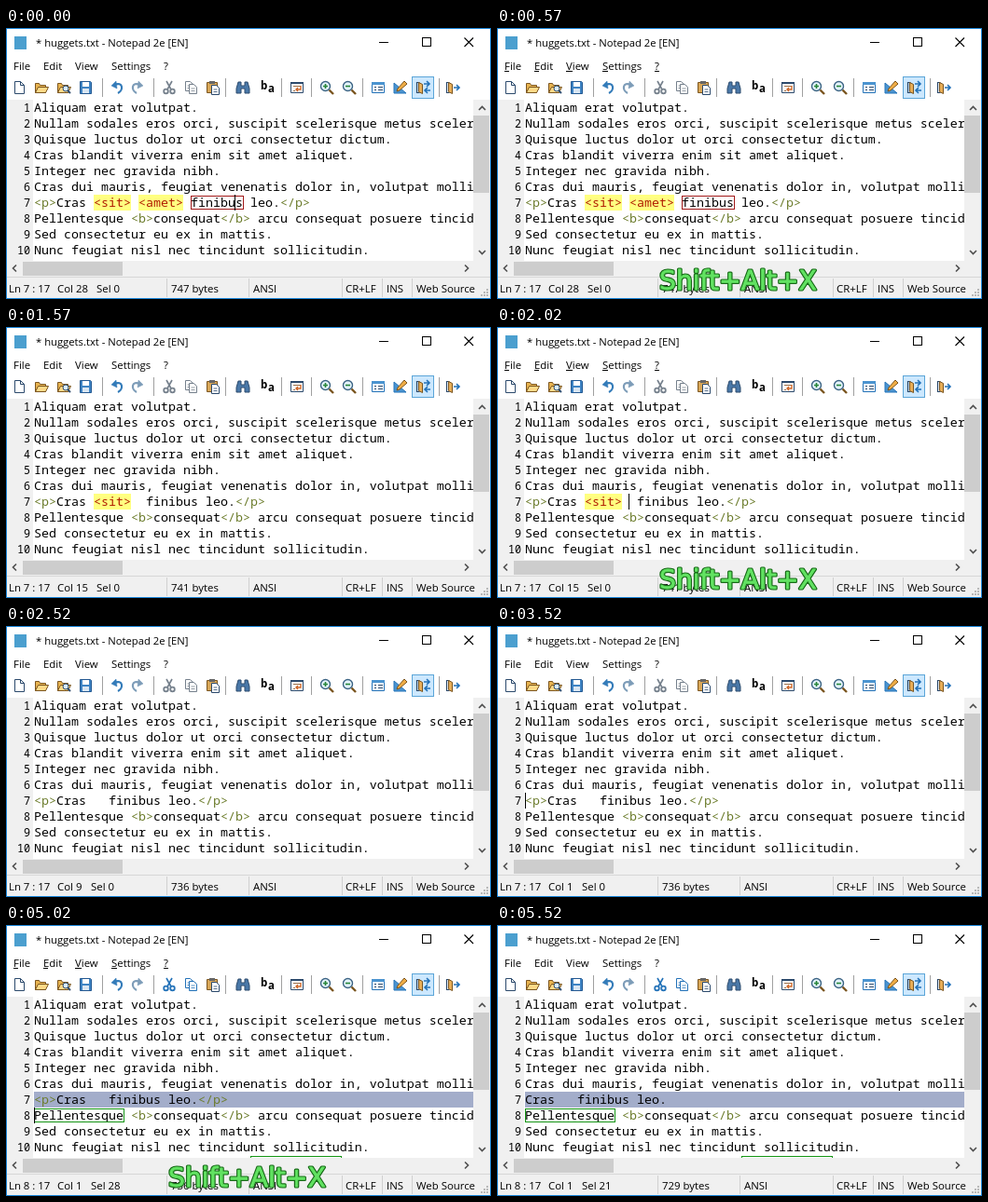
An HTML page that plays this animation: 520x291 px, repeating every 8 s.

```html
<!DOCTYPE html>
<html lang="en">
<head>
<meta charset="utf-8">
<title>Editor: strip tags</title>
<style>
html, body { margin: 0; width: 100%; height: 100%; overflow: hidden; background: #fff; }
svg { display: block; width: 100vw; height: 100vh; }
text { white-space: pre; }
.ui { font: 11.4px "Open Sans", "Noto Sans", sans-serif; }
.title { font: 11.25px "Open Sans", "Noto Sans", sans-serif; }
.glyph { font: 700 11.5px "Open Sans", "Noto Sans", sans-serif; }
.code { font: 13.333px "Noto Sans Mono", "DejaVu Sans Mono", monospace; }
.num { font: 11.7px "Noto Sans Mono", "DejaVu Sans Mono", monospace; text-anchor: end; }
.keys { font: 28.2px "DejaVu Sans", sans-serif; stroke-linejoin: round; }
.crisp { shape-rendering: crispEdges; }
</style>
</head>
<body>
<svg id="stage" viewBox="0 0 520 291"></svg>
<script>
const LOOP = 8000, LEFT = 30, RIGHT = 501, TOP = 77, CHAR = 8, ROW = 17;

const LINES = [
  'Aliquam erat volutpat.',
  'Nullam sodales eros orci, suscipit scelerisque metus sceler',
  'Quisque luctus dolor ut orci consectetur dictum.',
  'Cras blandit viverra enim sit amet aliquet.',
  'Integer nec gravida nibh.',
  'Cras dui mauris, feugiat venenatis dolor in, volutpat molli',
  '',
  'Pellentesque <b>consequat</b> arcu consequat posuere tincid',
  'Sed consectetur eu ex in mattis.',
  'Nunc feugiat nisl nec tincidunt sollicitudin.'
];

// Document states: text of line 7, caret position and status values.
const both = { text: '<p>Cras <sit> <amet> finibus leo.</p>', ln: 7, col: 28, sel: 0, bytes: 747, word: true };
const one = { text: '<p>Cras <sit>  finibus leo.</p>', ln: 7, col: 15, sel: 0, bytes: 741 };
const none = { text: '<p>Cras   finibus leo.</p>', ln: 7, col: 9, sel: 0, bytes: 736 };
const home = { ...none, col: 1 };
const selected = { ...home, ln: 8, sel: 28 };
const stripped = { ...selected, text: 'Cras   finibus leo.', sel: 21, bytes: 729 };

// [start ms, state, caret, menu underlines, key overlay]
const STEPS = [
  [0, both, 1, 0, 0],
  [570, both, 0, 1, 1],
  [1020, one, 1, 1, 0],
  [1570, one, 0, 0, 0],
  [2020, one, 1, 1, 1],
  [2520, none, 0, 0, 0],
  [3020, none, 1, 0, 0],
  [3520, home, 1, 0, 0],
  [4020, selected, 1, 0, 0],
  [4520, selected, 0, 0, 0],
  [5020, selected, 1, 1, 1],
  [5520, stripped, 0, 0, 0]
];

const rect = (x, y, w, h, fill, extra = '') =>
  `<rect class="crisp" x="${x}" y="${y}" width="${w}" height="${h}" fill="${fill}" ${extra}/>`;
const frame = (x, y, w, h, color, fill = 'none') =>
  rect(x + .5, y + .5, w - 1, h - 1, fill, `stroke="${color}"`);
const path = (d, stroke, width = 1, fill = 'none') =>
  `<path d="${d}" stroke="${stroke}" stroke-width="${width}" fill="${fill}"/>`;
const escape = s => s.replace(/&/g, '&amp;').replace(/</g, '&lt;');
const text = (x, y, s, cls = 'ui', extra = '') =>
  `<text class="${cls}" x="${x}" y="${y}" ${extra}>${s}</text>`;
const at = (x, content) => `<g transform="translate(${x} 56)">${content}</g>`;

function codeLine(source, row) {
  const y = TOP + row * ROW;
  let marks = '', spans = '';
  let col = 0;
  for (const part of source.split(/(<\/?\w+>)/)) {
    const unknown = /<(sit|amet)>/.test(part);
    if (unknown) marks += rect(LEFT + col * CHAR, y, part.length * CHAR, ROW, '#ffff80');
    const color = unknown ? '#b01c00' : part[0] === '<' ? '#6c7c2c' : '#000';
    spans += `<tspan fill="${color}">${escape(part)}</tspan>`;
    col += part.length;
  }
  return marks + text(LEFT, y + 13, spans, 'code');
}

function toolbar(canCut) {
  const navy = '#2c4a6c', blue = '#2372b8', brown = '#7a5520';
  const page = (x, y, color) => path(`M${x} ${y}h5l3 3v7h-8z`, color, 1, '#fff') +
    path(`M${x + 2} ${y + 4.5}h4m-4 2.5h4`, color, .8);
  const folder = path('M1.5 13.5v-10h4l1 2h6v8z', brown, 1, '#e8b450') +
    path('M1.5 13.5l3-6h11l-3 6z', brown, 1, '#ffd987');
  const cutColor = canCut ? blue : '#75808c';
  const lens = sign => '<circle cx="6.5" cy="6.5" r="5" fill="#e4f3fc" stroke="#3c6484" stroke-width="1.4"/>' +
    path('M10.5 10.5l4.5 4.5', brown, 2.4) + path(sign, '#268538', 1.6);
  const door = path('M4.5 2.5h-3v11h3', navy, 1.2) + path('M3.5 2.5l4 2v10l-4-2z', brown, 1, '#e8ae58');
  const arrow = (y, dir) => dir > 0
    ? path(`M9 ${y}h6m-3-3l3 3-3 3`, blue, 1.6)
    : path(`M16 ${y}h-6m3-3l-3 3 3 3`, blue, 1.6);
  const undo = color => path('M5 5c10-4 10 6 4 9', color, 2.2) + path('M7 1L2 6l6 3z', color, .5, color);

  return [103, 158, 235, 295, 327, 382, 464].map(x => rect(x, 54, 1, 20, '#a0a0a0')).join('') +
    at(7, path('M2.5 1.5h6l4 4v9h-10z', navy, 1, '#fff') + path('M8.5 1.5v4h4', navy)) +
    at(30, folder) +
    at(54, folder + '<circle cx="10" cy="9" r="3" fill="#d8effc" stroke="#2c4a6c"/>' + path('M12 11l3 3', navy, 1.8)) +
    at(78, path('M1.5 1.5h11l1 1v12h-12z', '#235891', 1, '#3f84c4') + rect(4, 2, 7, 5, '#fff') + rect(4, 9, 7, 5, '#d9e6f2')) +
    at(111, undo('#337bb9')) +
    at(133, `<g transform="matrix(-1 0 0 1 16 0)">${undo('#7d9cb8')}</g>`) +
    at(167, path('M5 1l5 9M11 1L6 10', cutColor, 1.6) +
      `<g fill="none" stroke="${cutColor}" stroke-width="1.8"><circle cx="4.5" cy="12" r="2.3"/><circle cx="11.5" cy="12" r="2.3"/></g>`) +
    at(190, page(2.5, 1.5, cutColor) + page(6.5, 4.5, cutColor)) +
    at(214, path('M1.5 2.5h11v11h-11z', brown, 1, '#d9a758') + rect(4, 1, 6, 3, '#666') + page(6.5, 5.5, navy)) +
    at(246, path('M3 2h3v4h4V2h3l2 7v5h-5V9H6v5H1V9z', navy, 1, '#4a78a8')) +
    text(273, 66, 'b', 'glyph') + text(281, 69, 'a', 'glyph') +
    at(304, path('M1.5 2.5h13v11h-13z', navy, 1, '#fff') + rect(1, 2, 14, 2, navy) +
      path('M4 6.5h8M4 11.5h2', '#9a6e48') + path('M12 6v4H7m2-2L7 10l2 2', '#d06728', 1.4)) +
    at(336, lens('M4 6.5h5M6.5 4v5')) +
    at(360, lens('M4 6.5h5')) +
    at(391, path('M1.5 2.5h13v11h-13z', blue, 1, '#fff') + rect(1, 2, 14, 3, '#4b94d0') +
      path('M4 7.5h2M8 7.5h5M4 10.5h2M8 10.5h5', navy)) +
    at(415, path('M1 3v11h13z', blue, 1, '#4b94d0') + path('M5 9l7-8 3 3-8 7-3 1z', brown, 1, '#f0ad45')) +
    frame(435, 52, 24, 24, '#5ba5d8', '#cce8ff') +
    at(439, door + arrow(4, 1) + arrow(11, -1)) +
    at(471, door + arrow(8, 1));
}

function chrome() {
  const arrow = d => path(d, '#505050', 1.6);
  let grip = '';
  for (let i = 0; i < 3; i++)
    for (let j = 0; j <= i; j++) grip += rect(515 - j * 3, 280 + i * 3, 2, 2, '#b8b8b8');
  return rect(RIGHT, 77, 18, 173, '#f0f0f0') + rect(RIGHT, 94, 17, 83, '#cdcdcd') +
    arrow('M507 88l3.5-3.5 3.5 3.5M507 239l3.5 3.5 3.5-3.5') +
    rect(1, 250, 518, 18, '#f0f0f0') + rect(18, 251, 107, 15, '#cdcdcd') +
    arrow('M11 254.5L7.5 258l3.5 3.5M492 254.5l3.5 3.5-3.5 3.5') +
    rect(1, 268, 518, 22, '#f0f0f0') + rect(1, 267, 518, 1, '#d7d7d7') +
    [172, 260, 360, 403, 435].map(x => rect(x, 269, 1, 20, '#d0d0d0')).join('') + grip;
}

function draw([, doc, caret, underlined, keys]) {
  const caretX = Math.max(LEFT, LEFT - 1 + (doc.col - 1) * CHAR);
  const menu = [['File', 8, 5], ['Edit', 40, 5], ['View', 74, 7], ['Settings', 113, 6], ['?', 169, 5]];
  let out = rect(0, 0, 520, 291, '#fff') +
    rect(9, 9, 13, 14, '#4b9fcf') +
    text(32, 20, '* huggets.txt - Notepad 2e [EN]', 'title') +
    rect(400, 15, 10, 1, '#000') + frame(446, 10, 10, 10, '#000') +
    path('M491.5 10.5l9.5 9.5M501 10.5l-9.5 9.5', '#000', 1.1);

  for (const [label, x, width] of menu) {
    out += text(x, 45, label);
    if (underlined) out += rect(x, 46, width, 1, '#000');
  }
  out += toolbar(doc.sel > 0) + rect(1, TOP, 28, 173, '#f0f0f0');

  if (doc.sel) out += rect(LEFT, TOP + 6 * ROW, RIGHT - LEFT, ROW, '#a3adca');
  let code = '';
  LINES.forEach((line, row) => {
    code += codeLine(row === 6 ? doc.text : line, row) + text(26, TOP + row * ROW + 13, row + 1, 'num');
  });
  if (doc.word) code += frame(198, 180, 57, 15, '#a01818');
  if (doc.sel) code += frame(30, 197, 97, 15, '#149614') + frame(262, 248, 98, 15, '#149614');
  if (caret) code += rect(caretX, TOP + (doc.ln - 1) * ROW, 1, ROW, '#000');
  out += `<g clip-path="url(#editor)">${code}</g>` + chrome();

  const selX = doc.col > 9 ? 97 : 91;
  out += [[3, `Ln ${doc.ln} : 17`], [55, `Col ${doc.col}`], [selX, `Sel ${doc.sel}`],
    [177, `${doc.bytes} bytes`], [265, 'ANSI'], [364, 'CR+LF'], [408, 'INS'], [440, 'Web Source']]
    .map(([x, label]) => text(x, 284, label)).join('');
  out += frame(0, 0, 520, 291, '#1883d7');

  if (keys) {
    const label = (stroke, width) => text(174, 281, 'Shift+Alt+X', 'keys',
      `fill="#62e262" stroke="${stroke}" stroke-width="${width}"`);
    out += label('#176a17', 3.2) + label('#62e262', .8);
  }
  stage.innerHTML = `<clipPath id="editor"><rect x="1" y="${TOP}" width="${RIGHT - 1}" height="173"/></clipPath>` + out;
}

const stage = document.getElementById('stage');
const start = performance.now();
let shown;
function tick() {
  const time = (performance.now() - start) % LOOP;
  const step = STEPS.findLast(s => s[0] <= time);
  if (step !== shown) draw(shown = step);
  requestAnimationFrame(tick);
}
tick();
</script>
</body>
</html>
```
